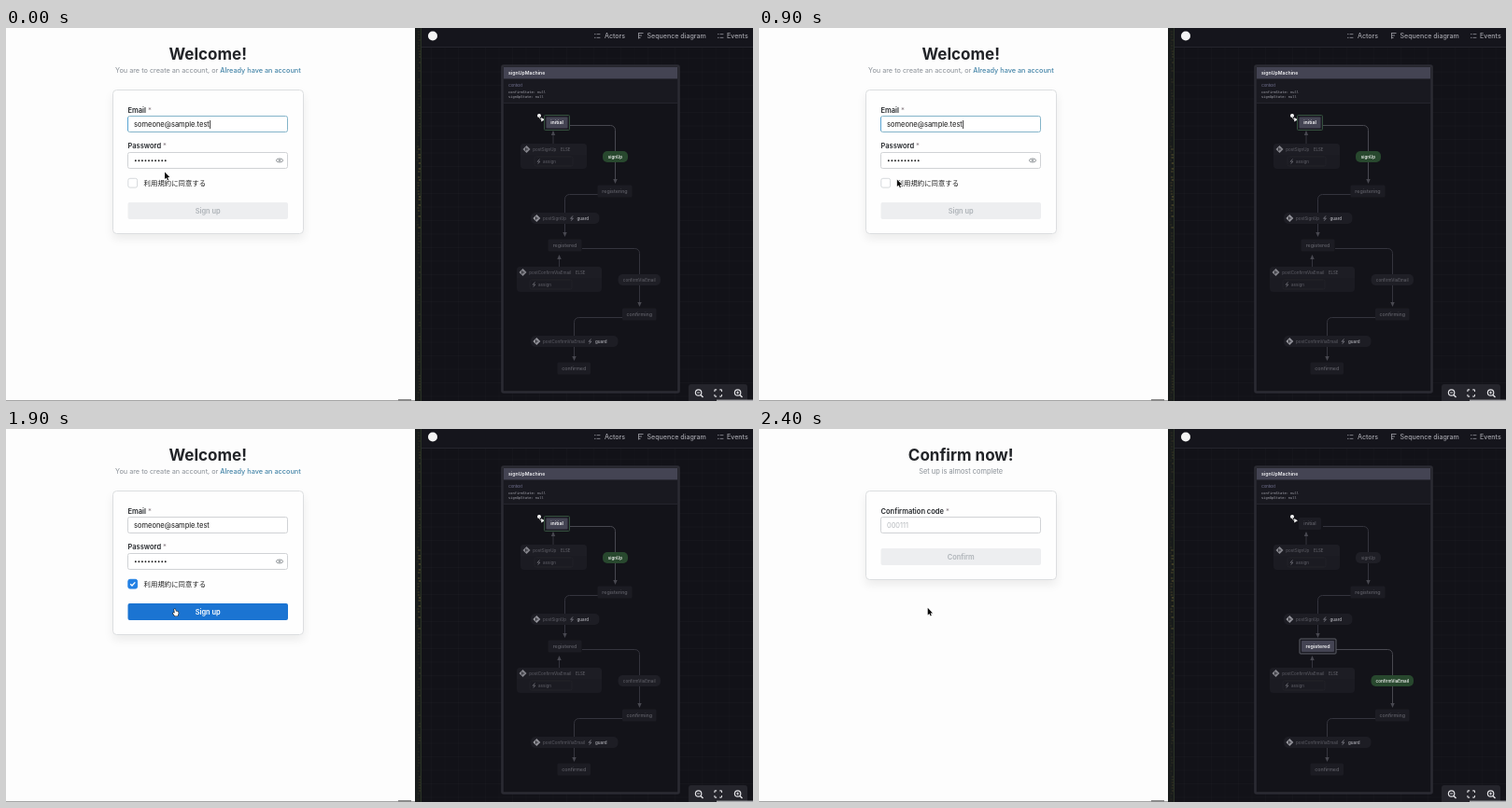
An HTML page with a canvas that plays this animation: 800 by 400 pixels, repeating every 2.5 s.

```html
<!DOCTYPE html>
<html lang="en">
<head>
<meta charset="utf-8">
<title>Sign up flow</title>
<style>
html, body { margin: 0; width: 100%; height: 100%; overflow: hidden; background: #fdfdfd; }
canvas { display: block; width: 800px; height: 400px; }
</style>
</head>
<body>
<canvas id="stage" width="800" height="400"></canvas>
<script>
const ctx = document.getElementById('stage').getContext('2d');
const SANS = 'Inter, "Noto Sans CJK JP", "Noto Sans CJK", sans-serif';
const MONO = '"DejaVu Sans Mono", monospace';
const LOOP = 2500, CHECK = 1100, HOVER = 1400, SUBMIT = 2000, DONE = 2300;
const BLUE = '#2180e4', GREEN = '#224c2a', SLATE = '#444453', DIM = '#56565e', EDGE = '#34343d', LIVE = '#484850';

function text(str, x, y, size, color, weight = 400, align = 'left', family = SANS) {
  ctx.font = `${weight} ${size}px ${family}`;
  ctx.textAlign = align;
  ctx.fillStyle = color;
  ctx.fillText(str, x, y);
  return ctx.measureText(str).width;
}

function rect(x, y, w, h, r, fill, stroke, lw = 1) {
  ctx.beginPath();
  ctx.roundRect(x, y, w, h, r);
  if (fill) { ctx.fillStyle = fill; ctx.fill(); }
  if (stroke) { ctx.strokeStyle = stroke; ctx.lineWidth = lw; ctx.stroke(); }
}

function circle(x, y, r, fill, stroke, lw = 1) {
  ctx.beginPath();
  ctx.arc(x, y, r, 0, 7);
  if (fill) { ctx.fillStyle = fill; ctx.fill(); }
  if (stroke) { ctx.strokeStyle = stroke; ctx.lineWidth = lw; ctx.stroke(); }
}

// Open line through points, with rounded corners
function line(pts, color, lw = 1, r = 0) {
  ctx.beginPath();
  ctx.moveTo(...pts[0]);
  for (let i = 1; i < pts.length - 1; i++) ctx.arcTo(...pts[i], ...pts[i + 1], r);
  ctx.lineTo(...pts[pts.length - 1]);
  ctx.strokeStyle = color;
  ctx.lineWidth = lw;
  ctx.stroke();
}

function poly(pts, fill) {
  ctx.beginPath();
  pts.forEach(p => ctx.lineTo(...p));
  ctx.closePath();
  ctx.fillStyle = fill;
  ctx.fill();
}

/* ---------- form ---------- */

function heading(str) {
  text(str, 216.2, 33.8, 17, '#222428', 700, 'center');
}

function label(str, y) {
  const w = text(str, 130.5, y, 7.5, '#25282c', 600);
  text('*', 132.5 + w, y, 7.5, '#8d8389', 500);
}

function field(y, focus) {
  rect(130.5, y + .5, 171, 17, 2, '#fff', focus ? '#84b4c9' : '#d0d2d5');
  if (focus) line([[130.5, y + 2], [130.5, y + 16]], '#5aa4d2');
}

function button(y, str, fill, color) {
  rect(130.5, y, 171.5, 18, 2, fill);
  text(str, 216.2, y + 11.7, 7.4, color, 600, 'center');
}

function card(h) {
  ctx.save();
  ctx.shadowColor = 'rgba(0,0,0,.08)';
  ctx.shadowBlur = 11;
  ctx.shadowOffsetY = 5;
  rect(114.5, 66.5, 204, h, 4, '#fefefe');
  ctx.restore();
  rect(114.5, 66.5, 204, h, 4, '#fefefe', '#dcdee0');
}

function eye(color) {
  ctx.beginPath();
  ctx.ellipse(293, 142, 3.6, 2, 0, 0, 7);
  ctx.strokeStyle = color;
  ctx.lineWidth = .8;
  ctx.stroke();
  circle(293, 142, 1, null, color, .8);
}

function signUpFields(t) {
  const checked = t >= CHECK, loading = t >= SUBMIT;
  label('Email', 90.5);
  field(94, !checked);
  const w = text('someone@sample.test', 137, 106, 7.5, '#111', 400);
  if (!checked) line([[137.8 + w, 99], [137.8 + w, 108]], '#111', .8);
  label('Password', 129.2);
  field(133, false);
  if (loading) text('Your password', 137, 144.7, 7.4, '#adb5bd');
  else for (let i = 0; i < 10; i++) circle(138.8 + i * 3.55, 142.2, .95, '#222');
  eye('#7b8086');
  rect(130.8, 161.3, 9.8, 9.8, 2, checked ? BLUE : '#fff', checked ? BLUE : '#d2d5d9', .9);
  if (checked) line([[133.2, 166.3], [135, 168], [138.3, 164.4]], '#fff', 1.3);
  text('利用規約に同意する', 147.6, 168.5, 7.4, '#222');
  if (!checked) button(187, 'Sign up', '#edeef0', '#aeb3b8');
  else button(187, 'Sign up', t >= HOVER ? '#1b74d2' : BLUE, '#fff');
}

function form(t) {
  ctx.fillStyle = '#fdfdfd';
  ctx.fillRect(0, 0, 438, 400);
  if (t >= DONE) {
    heading('Confirm now!');
    text('Set up is almost complete', 216.2, 48.3, 7.4, '#8a9097', 400, 'center');
    card(95);
    label('Confirmation code', 90.5);
    field(94, false);
    text('000111', 137, 106, 7.4, '#b4b8bc');
    button(128, 'Confirm', '#edeef0', '#aeb3b8');
  } else {
    heading('Welcome!');
    const w = text('You are to create an account, or ', 117, 48.3, 7.3, '#8a9097');
    text('Already have an account', 117 + w, 48.3, 7.3, '#4585a8', 500);
    card(154);
    if (t < SUBMIT) signUpFields(t);
    else {
      ctx.save();
      ctx.filter = 'blur(1px)';
      signUpFields(t);
      ctx.restore();
      rect(114, 66, 205, 155, 4, 'rgba(255,255,255,.72)');
      const a = (t - 2200) / 1000 * Math.PI * 2;
      ctx.beginPath();
      ctx.arc(216.2, 143.2, 8.7, a - Math.PI * 1.5, a);
      ctx.strokeStyle = '#4788c6';
      ctx.lineWidth = 2;
      ctx.stroke();
    }
  }
  ctx.fillStyle = '#a5a5a5';
  ctx.fillRect(0, 399, 438, 1);
  rect(420, 398, 14, 2, 0, '#8a8a8a');
}

/* ---------- state chart ---------- */

function wire(pts, color = EDGE) {
  line(pts, color, 1, 5);
  const [x, y] = pts[pts.length - 1], d = Math.sign(y - pts[pts.length - 2][1]);
  poly([[x, y + d], [x - 2.2, y - 4 * d], [x + 2.2, y - 4 * d]], '#484850');
}

function node(name, x, y, w, h, active, ring) {
  if (active) {
    rect(x - 1.5, y - 1.5, w + 3, h + 3, 1, '#1b1b23', ring);
    rect(x + .5, y + .5, w - 1, h - 1, 1, SLATE);
  } else rect(x, y, w, h, 1.5, '#1c1c23');
  text(name, x + w / 2, y + h / 2 + 1.9, 5.3, active ? '#f4f4f6' : '#606068', active ? 600 : 500, 'center');
}

function eventPill(name, x, y, w, active) {
  rect(x, y, w, 12, 5, active ? '#28482e' : '#1f1f26');
  text(name, x + w / 2, y + 7.7, 4.5, active ? '#e8ebe8' : '#5c5c64', active ? 600 : 500, 'center');
}

function diamond(x, y, color) {
  poly([[x, y - 4], [x + 4, y], [x, y + 4], [x - 4, y]], color);
  line([[x - .8, y - 1.7], [x - .8, y + 1.7]], '#25252c', .9);
  line([[x - .8, y], [x + 1.6, y]], '#25252c', .9);
}

function bolt(x, y, color) {
  line([[x + 1, y - 2.5], [x - 1.4, y + .3], [x + 1.4, y], [x - .8, y + 2.7]], color, .9);
}

function elseBox(name, x, y, w, h, elseX, actX, actW, active) {
  rect(x, y, w, h, 4, '#1b1b22');
  rect(x, y, w, 12, [4, 4, 0, 0], active ? GREEN : '#1d1d24');
  diamond(x + 6.5, y + 6, active ? '#8fa895' : '#85858c');
  text(name, x + 13.3, y + 7.6, 4.5, active ? '#fff' : DIM, active ? 600 : 500);
  text('ELSE', elseX, y + 7.6, 4.3, active ? '#c5d2c7' : '#606068', 500);
  rect(actX, y + 14, actW, 10, 1.5, '#1b1b22', '#26262d', .7);
  bolt(actX + 4.5, y + 19, active ? '#ddd' : '#67676f');
  text('assign', actX + 9, y + 20.5, 4.5, active ? '#eee' : DIM, 500);
}

function guardPill(name, y, w, guardX, active) {
  rect(562, y, w, 12, 5, active ? GREEN : '#1d1d24');
  diamond(568.3, y + 6, active ? '#7f9986' : '#929299');
  text(name, 575, y + 7.6, 4.5, active ? '#fff' : DIM, active ? 600 : 500);
  bolt(guardX - 5.5, y + 6, active ? '#a4b9a8' : '#77777f');
  text('guard', guardX, y + 7.6, 4.5, active ? '#7d9b83' : '#a0a0a7', 600);
}

function listIcon(x, y) {
  for (let i = 0; i < 2; i++) {
    line([[x + 2.6, y + i * 3.8], [x + 6.4, y + i * 3.8]], '#94949b', .8);
    line([[x, y + i * 3.8], [x + 1.5, y + i * 3.8]], '#94949b', .8);
  }
}

function zoomIcon(x, plus) {
  circle(x - .7, 391, 3.2, null, '#e4e4e8', 1.2);
  line([[x + 1.7, 393.4], [x + 4.2, 395.9]], '#e4e4e8', 1.4);
  line([[x - 2.2, 391], [x + .8, 391]], '#e4e4e8', .9);
  if (plus) line([[x - .7, 389.5], [x - .7, 392.5]], '#e4e4e8', .9);
}

function chrome() {
  ctx.fillStyle = '#191c1c';
  ctx.fillRect(438, 0, 7, 400);
  for (let y = 0; y < 400; y += 3) {
    const k = Math.abs(Math.sin(y * 12.9898) * 43758.5453) % 1;
    const lit = y > 125 && y < 215 ? .4 : .16;
    ctx.fillStyle = `rgba(125,110,55,${k * lit})`;
    ctx.fillRect(439 + k * 3, y, 2.5, 2);
  }
  ctx.fillStyle = '#2b3326';
  ctx.fillRect(444, 0, 1, 400);
  ctx.fillStyle = '#121218';
  ctx.fillRect(445, 0, 355, 400);
  ctx.fillStyle = 'rgba(255,255,255,.014)';
  for (let x = 455; x < 800; x += 14.5) ctx.fillRect(x, 21, 1, 379);
  for (let y = 32; y < 400; y += 14.5) ctx.fillRect(445, y, 355, 1);
  ctx.fillStyle = '#15151c';
  ctx.fillRect(445, 0, 355, 20);
  ctx.fillStyle = '#25252d';
  ctx.fillRect(445, 20, 355, 1);
  circle(457, 8.5, 5, '#f4f4f4');
  listIcon(630, 6.6);
  text('Actors', 641, 10.8, 7.05, '#a3a3aa', 500);
  line([[677.5, 5], [677.5, 11.5]], '#94949b', .9);
  [5.5, 8, 10.5].forEach((y, i) => line([[677.5, y], [682.5 - i * 1.5, y]], '#94949b', .9));
  text('Sequence diagram', 686.5, 10.8, 7.05, '#a3a3aa', 500);
  listIcon(762, 6.6);
  text('Events', 772, 10.8, 7.05, '#a3a3aa', 500);
}

function chart(t) {
  const step = t < SUBMIT ? 0 : t < DONE ? 1 : 2;
  const initial = step === 0, registering = step === 1, registered = step === 2;
  chrome();
  rect(531.5, 40.5, 189, 350, 1.5, '#131319', '#2b2b33', 2.6);
  rect(533, 42, 186, 12.5, 0, SLATE);
  text('signUpMachine', 538, 50.3, 5.2, '#f0f0f3', 600);
  rect(533, 55, 186, 25, 0, '#191920');
  ctx.fillStyle = '#25252d';
  ctx.fillRect(533, 80, 186, 1);
  text('Context', 538, 63.2, 4, '#6c6c88', 500);
  text('confirmState: null', 538, 70, 3.7, '#a3a3ac', 400, 'left', MONO);
  text('signUpState: null', 538, 75.2, 3.7, '#a3a3ac', 400, 'left', MONO);

  circle(571, 94, 2, '#fff');
  line([[571, 94], [571.5, 98], [575, 98]], '#bbb', .9, 2.5);
  poly([[577, 98.2], [573.2, 96], [573.2, 100.4]], '#eee');

  wire([[586, 124], [586, 111]], registering ? LIVE : EDGE);
  if (registering) line([[586, 151], [586, 198]], '#2b2b33');
  line([[604, 104.5], [652.5, 104.5], [652.5, 133]], initial ? LIVE : EDGE, 1, 5);
  wire([[652.5, 144], [652.5, 166]], initial ? LIVE : EDGE);
  wire([[634, 178.5], [598.5, 178.5], [598.5, 223]], registering ? LIVE : EDGE);
  wire([[592.5, 256], [592.5, 244]]);
  wire([[617, 236.5], [678.5, 236.5], [678.5, 298]], registered ? LIVE : EDGE);
  wire([[660, 310.5], [608.5, 310.5], [608.5, 356]]);

  node('initial', 578, 95, 24, 13, initial, '#34503d');
  elseBox('postSignUp', 551, 124, 71, 27, 594, 566, 41, registering);
  eventPill('signUp', 639, 132, 27, initial);
  node('registering', 633.5, 168.5, 37, 13, registering, '#7d8982');
  guardPill('postSignUp', 198, 73.5, 611.5, registering);
  node('registered', 580.5, 226.5, 36, 13, registered, '#5c5f66');
  elseBox('postConfirmViaEmail', 547, 256, 91, 27, 610, 561, 45, false);
  eventPill('confirmViaEmail', 655.5, 264, 45.5, registered);
  node('confirming', 660, 300.5, 36.5, 13, false);
  guardPill('postConfirmViaEmail', 330, 93.5, 631, false);
  node('confirmed', 590.5, 358.5, 35.5, 13, false);

  rect(731, 382, 63, 20, 3, '#25252c');
  zoomIcon(742.3, false);
  zoomIcon(784.3, true);
  for (const sx of [-1, 1]) for (const sy of [-1, 1])
    line([[762.7 + sx * 1.6, 391.5 + sy * 3.6], [762.7 + sx * 3.8, 391.5 + sy * 3.6], [762.7 + sx * 3.8, 391.5 + sy * 1.4]], '#dcdce0', 1.1, .8);
  ctx.fillStyle = '#a5a5a9';
  ctx.fillRect(761, 398.6, 39, 1.4);
}

/* ---------- pointer ---------- */

const PATH = [[0, 170, 154.5], [500, 214, 133], [1000, 141, 165.5], [1200, 141, 165.5], [1500, 180.7, 191.8], [LOOP, 180.7, 191.8]];

function pointer(t) {
  const i = PATH.findIndex((p, n) => n && t < p[0]);
  const [t0, x0, y0] = PATH[i - 1], [t1, x1, y1] = PATH[i];
  const k = (1 - Math.cos((t - t0) / (t1 - t0) * Math.PI)) / 2;
  ctx.save();
  ctx.translate(x0 + (x1 - x0) * k, y0 + (y1 - y0) * k);
  ctx.lineJoin = 'round';
  ctx.beginPath();
  const hand = t >= HOVER && t < SUBMIT;
  const shape = hand
    ? [[-.6, 1.5], [.5, 1.3], [1.3, 3.7], [3.5, 4], [4, 6], [3, 8.6], [.2, 8.6], [-2, 5.8], [-1.2, 5.1], [0, 5.8]]
    : [[0, 0], [0, 7.6], [1.8, 6.1], [3, 8.7], [4.1, 8.2], [3, 5.7], [5.3, 5.6]];
  shape.forEach(p => ctx.lineTo(...p));
  ctx.closePath();
  ctx.strokeStyle = hand ? '#151515' : '#fff';
  ctx.lineWidth = 1.2;
  ctx.stroke();
  ctx.fillStyle = hand ? '#fff' : '#0a0a0a';
  ctx.fill();
  ctx.restore();
}

const start = performance.now();

function draw() {
  const t = (performance.now() - start) % LOOP;
  form(t);
  chart(t);
  pointer(t);
  requestAnimationFrame(draw);
}
draw();
</script>
</body>
</html>
```
